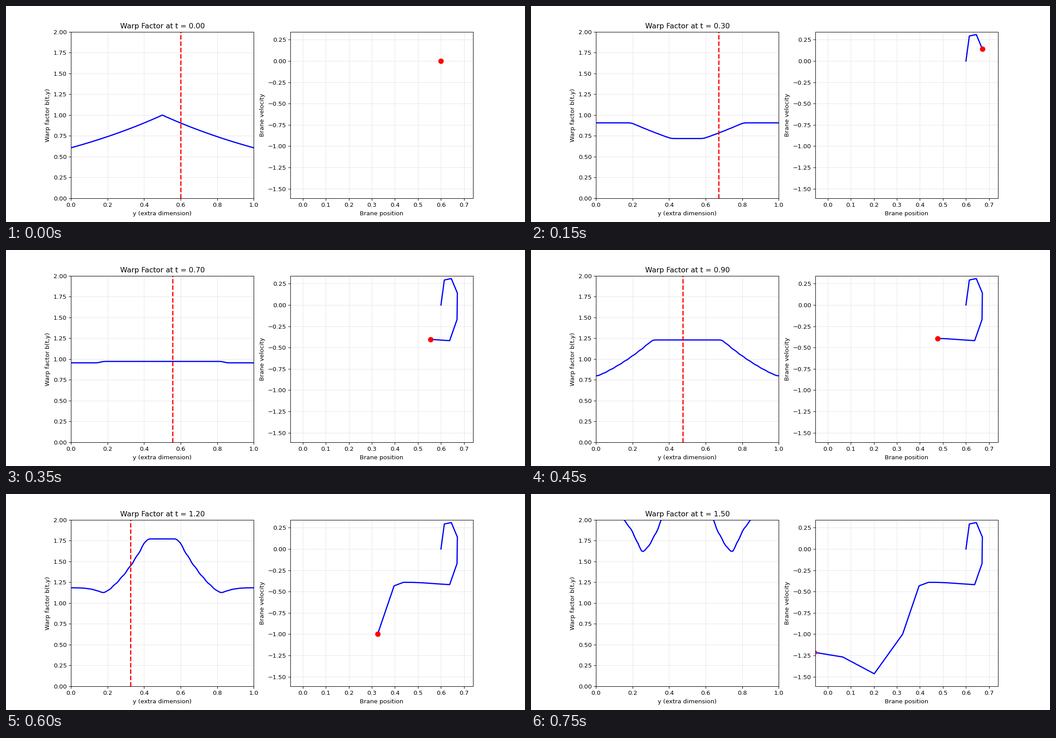
Write a matplotlib script that moves like this. It is 1159x483 px and loops after 800 ms.

```python
import numpy as np
import matplotlib.pyplot as plt
from matplotlib.animation import FuncAnimation

STEPS, DT = 16, 0.1
y = np.linspace(0, 1, 101)
half = 0.5 - np.abs(y - 0.5)


def track(*points):
    """Piecewise linear function of time through (t, value) points."""
    ts, vs = zip(*points)
    return lambda t: np.interp(t, ts, vs)


# Two kinks bounce between the edge (0) and the centre (0.5), slowing down
kink_u = track((0, 0), (0.365, 0.5), (0.5, 0.335), (0.89, 0),
               (1.1, 0.14), (1.3, 0.215), (1.5, 0.25))
kink_d = track((0, 0.5), (0.49, 0), (0.9, 0.31), (1.1, 0.39),
               (1.3, 0.437), (1.5, 0.46))
edge = track((0, np.exp(-0.5)), (0.2, 0.81), (0.49, 1.09), (0.7, 0.955),
             (0.89, 0.785), (1.1, 1.022), (1.3, 1.345), (1.5, 2.12))
centre = track((0, 1), (0.2, 0.8), (0.365, 0.665), (0.5, 0.772), (0.7, 0.972),
               (0.9, 1.23), (1.1, 1.54), (1.3, 2.003), (1.5, 2.8))
velocity = track((0, 0), (0.1, 0.294), (0.2, 0.311), (0.245, 0.311),
                 (0.48, -0.42), (0.85, -0.392), (1.03, -0.391), (1.1, -0.432),
                 (1.2, -1.0), (1.3, -1.465), (1.4, -1.268), (1.5, -1.213))


def warp(t):
    """Plateaus at edge and centre, joined by a slope between the kinks."""
    lo, hi = sorted((kink_u(t), kink_d(t)))
    dip = 2.4 * max(0, t - 0.9) ** 3
    outer = edge(t) - dip * (half / max(lo, 1e-6)) ** 3
    foot = edge(t) - dip
    u = np.clip((half - lo) / (hi - lo), 0, 1) ** (1 + 0.5 * max(0, t - 0.7))
    b = np.where(half < lo, outer, foot * (centre(t) / foot) ** u)

    w = min(t, 0.25)
    for _ in range(2):
        b = np.convolve(np.pad(b, 1, mode="reflect"), [w, 1 - 2 * w, w], "valid")

    # dispersive ripple on the slopes
    slope = np.abs(np.gradient(b, y))
    ripple = np.sin(2 * np.pi * (half - 0.285) / 0.04)
    return b - 0.0018 * min(t, 1) * slope * ripple


# Brane path: integrate the velocity finely, keep one sample per step
SUB = 100
v = velocity(np.arange((STEPS - 1) * SUB + 1) * DT / SUB)
x = 0.6 + np.concatenate([[0], np.cumsum((v[1:] + v[:-1]) / 2) * DT / SUB])
pos, vel = x[::SUB], v[::SUB]

fig, (ax1, ax2) = plt.subplots(1, 2, figsize=(12, 5), dpi=96.602)

curve, = ax1.plot(y, warp(0), "b-", lw=2)
wall = ax1.axvline(pos[0], color="r", ls="--", lw=2)
ax1.set(xlim=(0, 1), ylim=(0, 2),
        xlabel="y (extra dimension)", ylabel="Warp factor b(t,y)")
title = ax1.set_title("Warp Factor at t = 0.00")

trail, = ax2.plot([], [], "b-", lw=2)
dot, = ax2.plot([], [], "ro", ms=8)
ax2.set(xlim=(-0.054, 0.74), ylim=(-1.6115, 0.342),
        xlabel="Brane position", ylabel="Brane velocity")

for ax in (ax1, ax2):
    ax.grid(True, alpha=0.3)


def update(i):
    t = i * DT
    curve.set_ydata(warp(t))
    wall.set_xdata([pos[i], pos[i]])
    title.set_text(f"Warp Factor at t = {t:.2f}")
    trail.set_data(pos[:i + 1], vel[:i + 1])
    dot.set_data([pos[i]], [vel[i]])
    return curve, wall, title, trail, dot


anim = FuncAnimation(fig, update, frames=STEPS, interval=50,
                     repeat=True, repeat_delay=0, blit=False)
plt.show()
```
